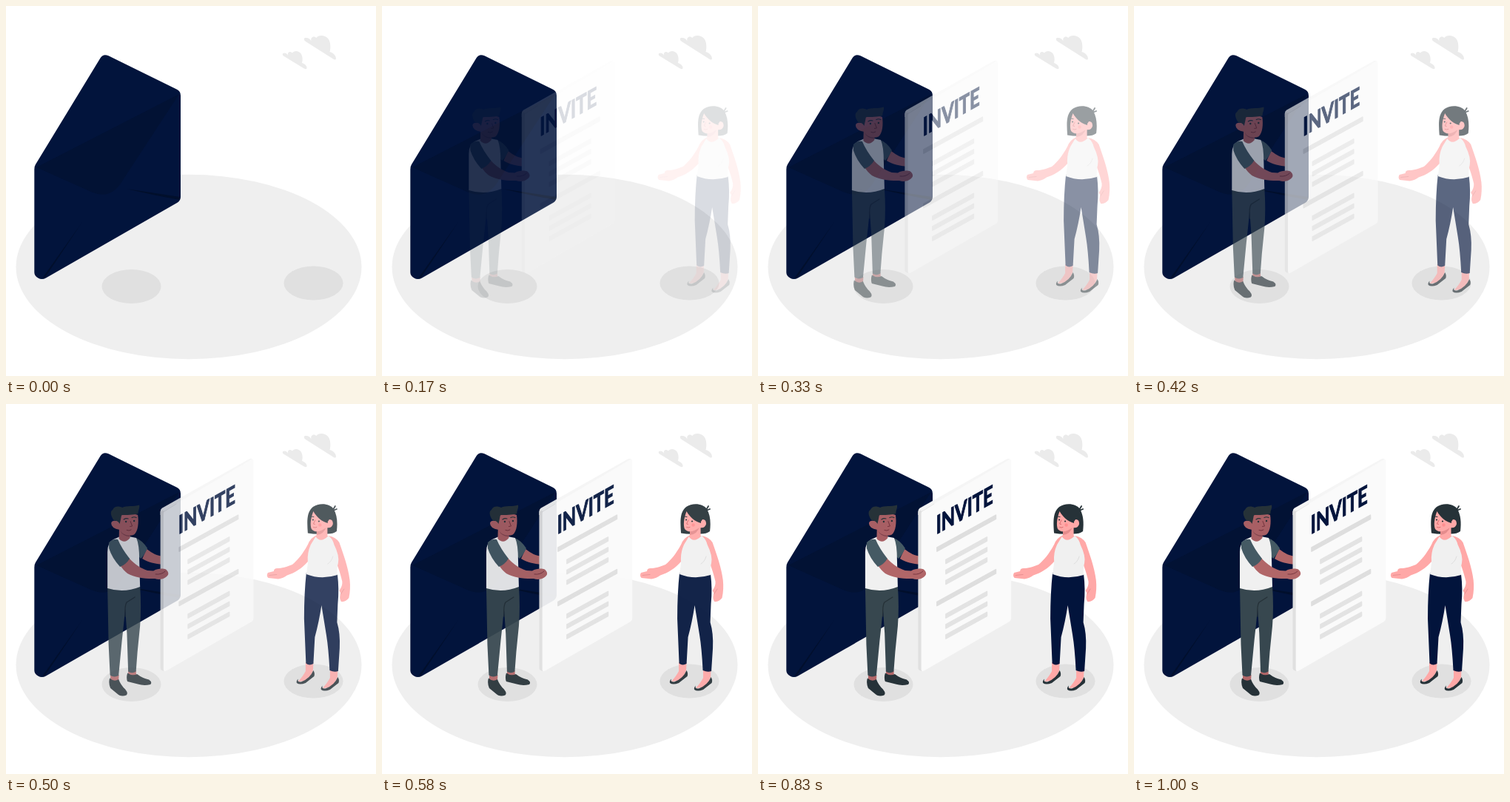
An HTML page that plays this animation: 500 by 500 pixels, repeating every 1040 ms.

```html
<!DOCTYPE html>
<html lang="en">
<head>
<meta charset="utf-8">
<title>Invite</title>
<style>
  html, body { margin: 0; width: 100%; height: 100%; overflow: hidden; background: #fff; }
  svg { display: block; width: 100vw; height: 100vh; }
  .navy { fill: #02143c; }
  .dark { fill: #263238; }
  .slate { fill: #37474f; }
  .sleeve { fill: #455a64; }
  .white { fill: #f0f0f0; }
  .brown { fill: #b16668; }
  .face { fill: #a85f64; }
  .pink { fill: #ffa8a7; }
  .line { fill: none; stroke-linecap: round; stroke-linejoin: round; }
  .title { font: 700 34px Lato, "Open Sans", sans-serif; text-anchor: middle; stroke: #02143c; stroke-width: 1.2; }
</style>
</head>
<body>
<svg viewBox="0 0 500 500">
  <defs>
    <g id="pump">
      <path class="pink" d="M399 349H409.500L409 360Q406 369 399 374L389 375Q396 367 399 361Z"/>
      <path class="dark" d="M389 371.500Q387 376 393 375.500Q405 371 409.500 360Q412 364 410.500 368Q404 373 399 377Q391 380 387 377Q386 374 389 371.500Z"/>
    </g>
  </defs>

  <ellipse cx="247" cy="352.500" rx="233.500" ry="124.700" fill="#efefef"/>
  <g fill="#e0e0e0">
    <ellipse cx="169.500" cy="379" rx="40" ry="23"/>
    <ellipse cx="415.500" cy="374.500" rx="40" ry="23"/>
  </g>
  <g fill="#ebebeb">
    <path d="M403 43.500C407 42 411 44 412.500 47.500C411 42 416 39.500 419.500 43C422 38.500 432 39 436 45C438.500 49 439 56 437.500 62C442 63 446 67 446 71.500Q445 73.500 442 71.500L405 48Q402 46 403 43.500Z"/>
    <path d="M374 64C377 62.500 380 64 381 67C380 62 384 60.500 387 63.500C389 60 396 60 399 65C401 69 401 73 400 77C404 78.500 407 81 406.500 84.500Q405 86 402 84L375 67.500Q373 66 374 64Z"/>
  </g>

  <path class="navy" d="M38.300 221Q38 217 40 214L127.700 70Q131.500 64 138.500 67.300L231 112.700Q236 115.300 236 121V258Q236 263 231.500 265.700L54 367.500Q48.500 370.500 43.300 367.500Q38.300 365 38.300 360Z"/>
  <path fill="#021234" d="M41 218L234 119L158 235Q143 262 117 252Z"/>
  <path fill="#010f2c" d="M163 247L235 258V262Q200 256 163 247ZM103 292L49 368L53 366.500Z"/>

  <g id="left">
    <path class="brown" d="M196 196C204 202 210 205 218 206V217C207 216 198 214 190 209Z"/>
    <path class="sleeve" d="M181 181Q190 184 197 195Q193 204 188 209L182 203Z"/>
    <path fill="#f5f5f5" d="M214.500 146Q214.500 142 217.500 140.300L334 74.500Q337 73 339 74.500L222 150H214.500Z"/>
    <path fill="#e0e0e0" d="M214.500 145L220 144.500L222 361Q214.500 361 214.500 357Z"/>
    <path fill="#fafafa" d="M218.700 148Q218.700 145 221 143.600L337 75.500Q340.300 73.500 340.300 77V289.500Q340.300 292.500 338 294L222.500 360.500Q218.700 362.500 218.700 358.500Z"/>
    <path class="line" stroke="#e0e0e0" stroke-width=".8" d="M215.500 143L219 145.500L236 135"/>
    <g id="bars"></g>
    <text class="title navy" transform="matrix(.7 -.39 0 1 277.300 154.800)">INVITE</text>

    <path class="brown" d="M147 366H158.500L158 375H147ZM171 360H181.500L182 368H171Z"/>
    <path class="dark" d="M146 370.500Q152 376 158 372Q161 380 167 385.500Q171.500 391 168.500 393.500Q161 396.500 155.500 391L147 384Q144 377 146 370.500ZM170 363.500Q176 368 183 365Q190 370.500 199 372.500Q204 376 201 379Q192 381 184 378.500L170 375Q168 370 170 363.500Z"/>
    <path class="slate" d="M143 247Q165 256 187 246Q189 275 187 300L183.500 335L181.500 361.500Q176 365 171 361.500L169.300 310L167 277Q165 298 162.500 320L158 367Q152 370 146.500 366.500L144.500 325Z"/>
    <path class="line" stroke="#263238" stroke-width="1.300" d="M167 287Q166 272 169 268L180 261"/>
    <path class="white" d="M151 183L160 179Q166 187 172 179L182 181Q186 190 186 210L187 247Q165 256 143 249V200Q143 187 151 183Z"/>
    <path class="face" d="M159 160L158.500 182Q166 190 173.500 181V172Z"/>
    <path fill="#7d414b" d="M160 171L173 176V179Q164 179 160 171Z"/>
    <path class="face" d="M157 152C166 148 180 148 184 150C185.500 160 184.500 172 179 176.500C172 179.500 163 177 159.500 170Q148 168 148 161Q149 157 155 158Z"/>
    <path class="dark" d="M152 157.500C147.500 152 146 145 150 143C152 138 158 137.500 163 140C169 136.500 178 139.500 186 136.500C187 141 184 144 184.500 148Q180 150 162 150Q161 156 159.500 162Q157 157 152 157.500Z"/>
    <path class="line" stroke="#263238" stroke-width="1.200" d="M165 156Q168 154 171 155M176 153.500Q179 152 182 153.500"/>
    <g class="dark"><circle cx="168" cy="159" r="1.200"/><circle cx="179" cy="158" r="1.200"/></g>
    <path class="line" stroke="#74343e" stroke-width="1" d="M174 158.500L176.500 165L173.500 165.500M169 170.500Q172 172 175 170"/>
    <path class="brown" d="M160 218L172 208C180 217 188 222 197 225L205 225.500C211 222 218 222 222 223.500Q226 227 225 230.500C222 236 214 238.500 207 236C195 236.500 180 234.500 170 229C166 226 163 222 160 218Z"/>
    <path class="line" stroke="#74343e" stroke-width=".9" d="M208 230Q216 231 221 226"/>
    <path class="sleeve" d="M145 187Q151 181.500 157 183Q162 195 173 209Q168 217 160 220Q149 208 145 195Z"/>
  </g>

  <g id="right">
    <use href="#pump"/>
    <use href="#pump" x="33" y="9"/>
    <path class="pink" d="M430 178Q440 180 444.500 187C450 203 456.500 220 458.700 238Q460 250 457.500 262Q453 268 447 267Q444 262 446.500 256L444.500 252Q449 246 448.500 240C446 228 441 215 437 205Z"/>
    <path class="line" stroke="#e58c8d" stroke-width=".9" d="M446.500 257L451 250"/>
    <path class="navy" d="M400 228Q420 237 442 230Q444.500 250 442.500 270L441.500 295Q446 310 445 330L443 361Q438 363 431.500 360Q430 330 427 312L420.500 272Q417 295 411.500 315L409.500 351Q404 354 399.500 350.500L397 290Q397 255 400 228Z"/>
    <path class="dark" d="M402 174.500C401 160 400 146 409 139C417 133 432 134 437 142C441.500 150 442.500 160 441 172Q436 176 426 175.500Q412 176.500 402 174.500Z"/>
    <path class="line" stroke="#263238" stroke-width="1.800" d="M436 143L439 138M436 144L441 142"/>
    <path class="pink" d="M414 166V177Q408 180 406 188L420 195L438 188Q436 180 428.500 178V162Z"/>
    <path fill="#e58c8d" d="M414 171Q422 172 427 166Q424 176 414 177Z"/>
    <path class="pink" d="M409.500 145C405.500 155 405 164 407 169Q412 174.500 420 171L427 167Q434.500 168.500 436 162Q436 155.500 431 156Q428.500 158.500 429 161C421 159 414 153 409.500 145Z"/>
    <path class="line" stroke="#263238" stroke-width="1" d="M406.500 152L410 152.500"/>
    <g class="dark"><circle cx="409" cy="156.500" r="1.100"/><circle cx="417" cy="158.500" r="1.100"/></g>
    <circle cx="418.500" cy="163.500" r="2.200" fill="#ff8f91"/>
    <path class="line" stroke="#d96c70" stroke-width="1" d="M412 157L409.500 162L411.500 162.500M409.500 166.500Q412 168 414 166.500"/>
    <path class="white" d="M412.500 179Q419 189 430 178Q436 183 437.500 190Q445 205 443 215Q441 222 442 231Q420 238 400 230L402 215Q400 200 405 190Q409 183 412.500 179Z"/>
    <path class="line" stroke="#dedede" stroke-width="1" d="M436 206Q434 213 429 216"/>
    <path class="pink" d="M413 178.500Q406 180 402 190C395 203 388 211 381 217C374 220 366 222 361 222Q356 222 356 226L348 228Q345.500 232 348.500 235L362 236.500Q369 235.500 374 231.500C385 228 394 222 402 213Q401 201 406 190Z"/>
    <path class="line" stroke="#e58c8d" stroke-width=".9" d="M350 231.500L360 230.500"/>
  </g>
</svg>
<script>
const LOOP = 1040, FPS = 24, SLIDE = 30, LEAD = 0.033;
const left = document.getElementById('left');
const right = document.getElementById('right');

// Slanted text lines of the letter: start x, end x, middle y at the start.
const lines = [
  [240, 319.5, 196.5], [252, 307.5, 213], [252, 307.5, 227], [252, 307.5, 241],
  [240, 319.5, 270], [252, 307.5, 286.5], [252, 307.5, 300.5], [252, 307.5, 314.5]
];
document.getElementById('bars').innerHTML = lines.map(([a, b, y]) => {
  const rise = (b - a) * 0.55;
  const color = b > 310 ? '#dedede' : '#e3e3e3';
  return `<path fill="${color}" stroke="${color}" stroke-width="1.6" stroke-linejoin="round"
    d="M${a} ${y - 2.6}L${b} ${y - 2.6 - rise}v5.2L${a} ${y + 2.6}z"/>`;
}).join('');

const bezier = (a, b, s) => 3 * s * (1 - s) ** 2 * a + 3 * s * s * (1 - s) * b + s ** 3;

// cubic-bezier(.36, -.01, .5, 1.38), which overshoots before it settles
function ease(t) {
  let lo = 0, hi = 1;
  for (let i = 0; i < 24; i++) {
    const mid = (lo + hi) / 2;
    if (bezier(0.36, 0.5, mid) < t) lo = mid; else hi = mid;
  }
  return bezier(-0.01, 1.38, hi);
}

function draw(ms) {
  const step = Math.floor((ms + 4.2) * FPS / 1000);
  const p = step < 2 ? 0 : ease(Math.min(1, step / FPS + LEAD));
  const shift = SLIDE * (1 - p);
  for (const [el, dir] of [[left, -1], [right, 1]]) {
    el.setAttribute('transform', `translate(${dir * shift} 0)`);
    el.setAttribute('opacity', Math.max(0, Math.min(1, p)));
  }
}

const start = performance.now();
function tick() {
  draw((performance.now() - start) % LOOP);
  requestAnimationFrame(tick);
}
draw(0);
requestAnimationFrame(tick);
</script>
</body>
</html>
```
